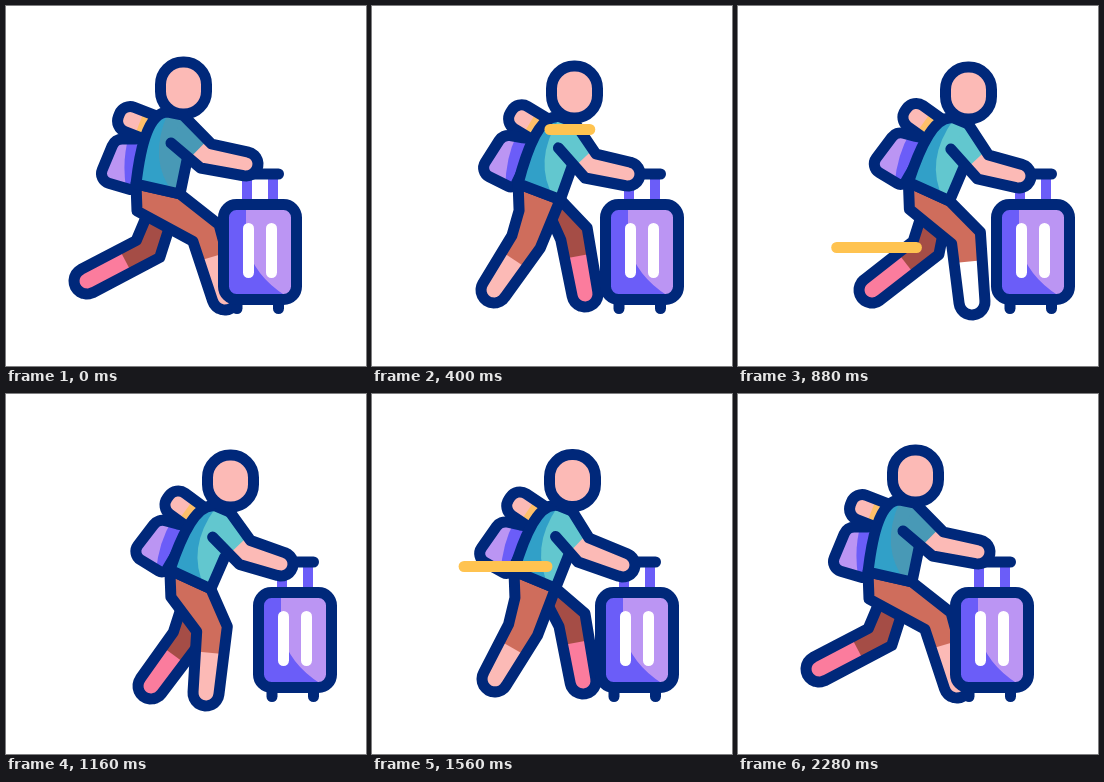
Animation of 360x360 px, one loop 2320 ms. Source, as an HTML page with a canvas:

```html
<!DOCTYPE html>
<html lang="en">
<head>
<meta charset="utf-8">
<title>Traveller with suitcase</title>
<style>
html, body { margin: 0; width: 100%; height: 100%; overflow: hidden; background: #fff; }
canvas { display: block; width: 100vw; height: 100vh; }
</style>
</head>
<body>
<canvas id="stage" width="360" height="360"></canvas>
<script>
const ctx = document.getElementById('stage').getContext('2d');
const LOOP = 2320, STEP = 40;
const NAVY = '#00287a', SKIN = '#fcbab6', ROSE = '#fb7c9d', VIOLET = '#6b5df8',
  LILAC = '#bb95f3', YELLOW = '#ffc350', BLUE = '#31a0c8', RUST = '#cf6d5c', BROWN = '#a54d46';

// Torso points, relative to the back of the shoulder.
const WAIST_L = [-27, 66], WAIST_R = [17, 76], NECK = [20, -3], ARMPIT = [8, 25];

// time, shoulder x y, lean, case left, elbow x y, hand y,
// near knee x y, near foot x y, far knee x y, far foot x y
const poses = [
  [0, 157, 112, 0, 212, 200, 150, 158, 200, 227, 219, 291, 142, 243, 81, 275],
  [400, 182, 116, 8, 228, 218.5, 160, 168, 154, 236, 122, 284, 202, 228, 213, 288],
  [880, 210, 117, 11.5, 253, 245, 161, 170, 228, 232, 234, 296, 188, 242, 134, 284],
  [1160, 204, 117, 12, 247, 239, 158.5, 170, 206, 235, 200, 299, 181, 243, 145, 292],
  [1560, 180, 116.5, 10, 223, 211.5, 156, 171, 151, 236, 123, 285, 200, 226, 211, 287],
  [1800, 166, 114, 4, 214, 201, 154.5, 166, 191, 232, 198, 295, 147, 245, 95, 284]
];
poses.push([2280, ...poses[0].slice(1)]);

const add = (a, b, k = 1) => [a[0] + b[0] * k, a[1] + b[1] * k];
const mix = (a, b, k) => [a[0] + (b[0] - a[0]) * k, a[1] + (b[1] - a[1]) * k];
const swing = (ang, len) => [Math.sin(ang) * len, Math.cos(ang) * len];
const polar = (a, b) => [Math.atan2(b[0] - a[0], b[1] - a[1]), Math.hypot(b[0] - a[0], b[1] - a[1])];
const ease = u => (1 - Math.cos(Math.PI * Math.min(1, Math.max(0, u)))) / 2;

function placer(x, y, deg) {
  const a = deg * Math.PI / 180, c = Math.cos(a), s = Math.sin(a);
  return p => [x + p[0] * c - p[1] * s, y + p[0] * s + p[1] * c];
}

const hipOf = at => mix(at(WAIST_L), at(WAIST_R), .5);

// Limbs move as angles and lengths, so legs swing instead of sliding.
const keys = poses.map(p => {
  const hip = hipOf(placer(p[1], p[2], p[3]));
  const limb = i => [...polar(hip, [p[i], p[i + 1]]), ...polar([p[i], p[i + 1]], [p[i + 2], p[i + 3]])];
  return [...p.slice(0, 8), ...limb(8), ...limb(12)];
});

const N = keys.length;
const key = i => keys[(i + N) % N];
const span = i => (key(i + 1)[0] - key(i)[0] + LOOP) % LOOP;
const slope = (i, ch) => (key(i + 1)[ch] - key(i)[ch]) / span(i);
function tangent(i, ch) {
  const a = slope(i - 1, ch), b = slope(i, ch);
  return a * b > 0 ? 2 * a * b / (a + b) : 0;
}

function poseAt(t) {
  let i = N - 1;
  while (keys[i][0] > t) i--;
  const d = span(i), u = (t - keys[i][0]) / d, v = 1 - u;
  return keys[i].map((from, ch) =>
    from * v * v * (1 + 2 * u) + key(i + 1)[ch] * u * u * (3 - 2 * u) +
    d * u * v * (tangent(i, ch) * v - tangent(i + 1, ch) * u));
}

function trace(pts, closed) {
  ctx.beginPath();
  pts.forEach(p => ctx.lineTo(p[0], p[1]));
  if (closed) ctx.closePath();
}
function fill(color) { ctx.fillStyle = color; ctx.fill(); }
function stroke(color = NAVY, w = 11) { ctx.strokeStyle = color; ctx.lineWidth = w; ctx.stroke(); }
function box(x, y, w, h, r) { ctx.beginPath(); ctx.roundRect(x, y, w, h, r); }
function bar(x1, y1, x2, y2, color, w) { trace([[x1, y1], [x2, y2]]); stroke(color, w); }

function cap(c, r, dir) {
  const pts = [];
  for (let i = 0; i <= 12; i++) {
    const a = dir + Math.PI / 2 - Math.PI * i / 12;
    pts.push(add(c, swing(a, r)));
  }
  return pts;
}

function leg(at, [a1, l1, a2, l2], near, cloth, skin) {
  const hip = hipOf(at), knee = add(hip, swing(a1, l1)), foot = add(knee, swing(a2, l2));
  const side = swing((a1 + a2) / 2 + Math.PI / 2, near ? 15.5 : 14.5);
  const back = at(WAIST_L);
  const start = near ? [back, at(WAIST_R)] : [hip, at(WAIST_R)];
  const pts = [...start, add(knee, side), ...cap(foot, 13, a2), add(knee, side, -1)];
  if (near) pts.push(add(back, [1, 27]));
  trace(pts, true);
  fill(cloth);
  ctx.save();
  ctx.clip();
  const cuff = mix(knee, foot, .37), wide = swing(a2 + Math.PI / 2, 40), down = swing(a2, 80);
  trace([add(cuff, wide), add(cuff, wide, -1), add(add(cuff, wide, -1), down), add(add(cuff, wide), down)], true);
  fill(skin);
  ctx.restore();
  trace(pts, true);
  stroke();
}

function backpack(x, y, lean) {
  ctx.save();
  ctx.translate(x, y);
  ctx.rotate(lean * 1.25 * Math.PI / 180);

  ctx.save();
  ctx.translate(-32, 2);
  ctx.rotate(.37);
  box(-13, -13, 54, 26, 11.5);
  fill(SKIN);
  ctx.fillStyle = '#ffc069';
  ctx.fillRect(9, -12, 26, 24);
  box(-13, -13, 54, 26, 11.5);
  stroke();
  ctx.restore();

  const bag = () => {
    ctx.beginPath();
    ctx.moveTo(-28, 21);
    ctx.arcTo(-13, 20, -28, 73, 4);
    ctx.arcTo(-28, 73, -64, 62, 6);
    ctx.arcTo(-65, 62, -48, 21, 10);
    ctx.arcTo(-48, 21, -28, 21, 11);
    ctx.closePath();
  };
  bag();
  fill(LILAC);
  ctx.save();
  ctx.clip();
  ctx.beginPath();
  ctx.moveTo(-34, 18);
  ctx.quadraticCurveTo(-42, 44, -36, 76);
  ctx.lineTo(0, 76);
  ctx.lineTo(0, 18);
  fill(VIOLET);
  ctx.restore();
  bag();
  stroke();
  ctx.restore();
}

function torso(x, y, lean, light) {
  ctx.save();
  ctx.translate(x, y);
  ctx.rotate(lean * Math.PI / 180);
  const outline = () => {
    ctx.beginPath();
    ctx.moveTo(24, 42);
    ctx.lineTo(...WAIST_R);
    ctx.lineTo(...WAIST_L);
    ctx.bezierCurveTo(-24, 40, -17, -6, 5, -6);
    ctx.lineTo(...NECK);
  };
  outline();
  fill(BLUE);
  ctx.beginPath();
  ctx.moveTo(...NECK);
  ctx.lineTo(5, -5);
  ctx.quadraticCurveTo(-16, 42, 11, 76);
  ctx.lineTo(24, 42);
  fill(light);
  outline();
  stroke();
  ctx.restore();
}

function arm(at, elbow, hand, light) {
  const bend = [5.5, -12], neck = at(NECK), pit = at(ARMPIT);
  const top = add(elbow, bend), low = add(elbow, bend, -1);
  const end = cap(hand, 12, polar(elbow, hand)[0]).reverse();
  const pts = [pit, low, ...end, top, neck];
  trace(pts, true);
  fill(light);
  trace([mix(pit, low, .62), low, ...end, top, mix(neck, top, .86)], true);
  fill(SKIN);
  trace(pts);
  stroke();
}

function suitcase(left) {
  ctx.save();
  ctx.translate(left, 0);
  bar(29, 172, 29, 196, VIOLET, 10);
  bar(55, 172, 55, 196, VIOLET, 10);
  bar(30, 168, 60.5, 168, NAVY, 11);
  bar(19, 297, 19, 302.5, NAVY, 11);
  bar(60.5, 297, 60.5, 302.5, NAVY, 11);
  box(5.5, 198.5, 73, 95, 13);
  fill(LILAC);
  ctx.save();
  ctx.clip();
  ctx.beginPath();
  ctx.moveTo(0, 190);
  ctx.lineTo(28, 190);
  ctx.lineTo(28, 238);
  ctx.quadraticCurveTo(36, 270, 68, 290);
  ctx.lineTo(0, 300);
  fill(VIOLET);
  ctx.restore();
  box(5.5, 198.5, 73, 95, 13);
  stroke();
  bar(30.5, 222.5, 30.5, 266.5, '#fff', 11);
  bar(53.5, 222.5, 53.5, 266.5, '#fff', 11);
  ctx.restore();
}

// A streak of wind: the tail follows the head after a short lag, then fades as a dot.
function streak(t, y, x0, x1, start, time, lag) {
  const age = t - start;
  if (age < 0 || age > time + lag + 90) return;
  const pos = a => x0 + (x1 - x0) * ease(a / time);
  ctx.globalAlpha = Math.min(1, Math.max(0, 1 - (age - time - lag) / 140));
  bar(pos(age - lag), y, pos(age) - .01, y, YELLOW, 11);
  ctx.globalAlpha = 1;
}

function draw(t) {
  const p = poseAt(t), [, x, y, lean, left, ex, ey, hy] = p;
  const at = placer(x, y, lean);
  const light = t < 120 || t >= 2160 ? '#4899b6' : '#62c7cf';
  ctx.fillStyle = '#fff';
  ctx.fillRect(0, 0, 360, 360);
  ctx.lineCap = ctx.lineJoin = 'round';

  leg(at, p.slice(12, 16), false, BROWN, ROSE);
  backpack(x, y, lean);
  leg(at, p.slice(8, 12), true, RUST, t >= 840 && t < 960 ? '#fff' : SKIN);
  torso(x, y, lean, light);
  box(x - 2.5, y - 56, 46, 52, 22.5);
  fill(SKIN);
  stroke();
  suitcase(left);
  arm(at, [ex, ey], [left + 28, hy], light);

  streak(t, 123.5, 250, 110, 181, 430, 82);
  streak(t, 241.5, 325, 91, 500, 430, 130);
  streak(t, 172.5, 325, 71, 1210, 430, 110);
}

function tick() {
  const t = performance.now() % LOOP;
  draw(Math.floor(t / STEP) * STEP);
  requestAnimationFrame(tick);
}
tick();
</script>
</body>
</html>
```
